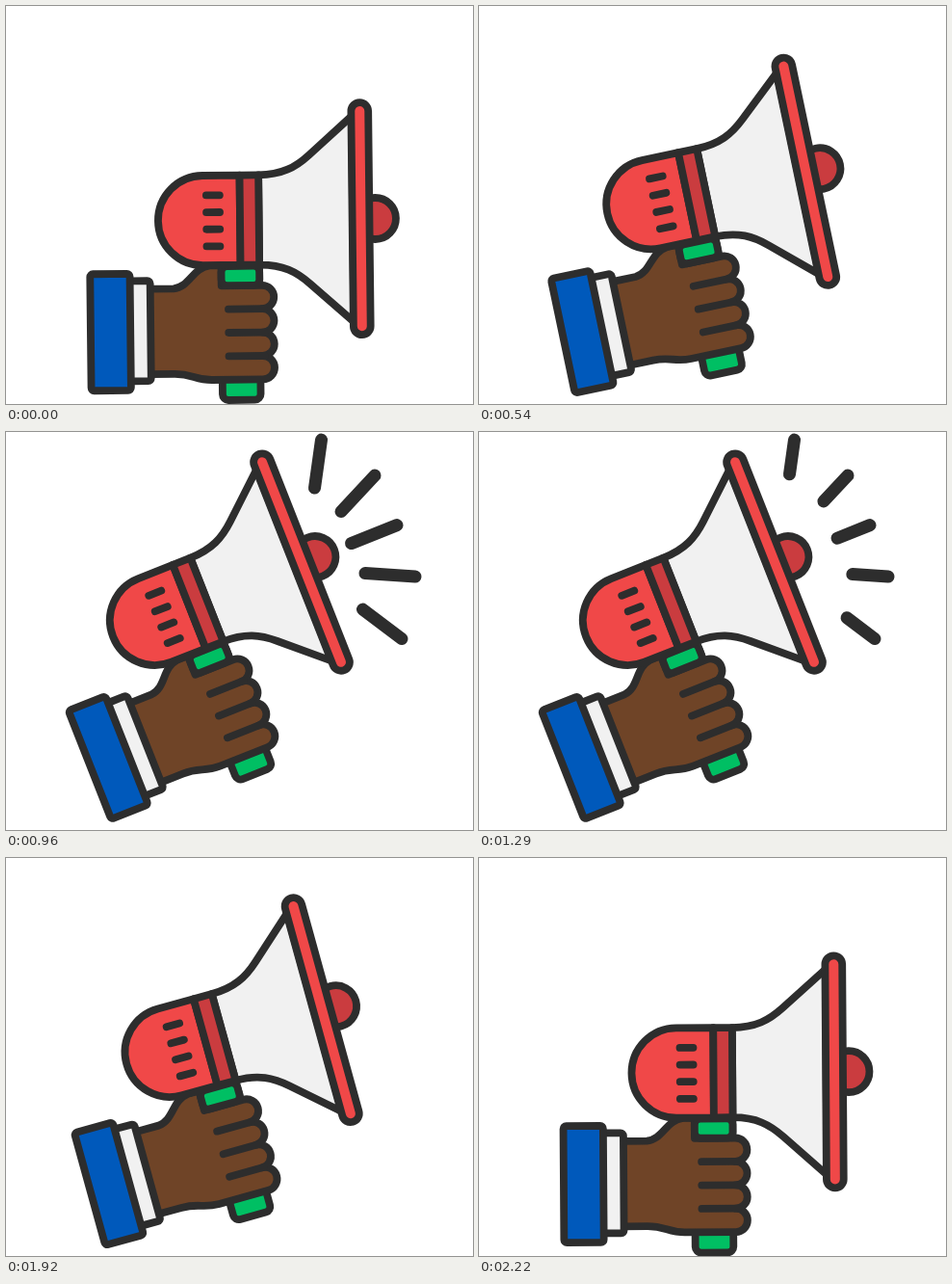
Animation, 485 px wide and 413 px high, one loop 2250 ms. Source, as an HTML page:

```html
<!DOCTYPE html>
<html lang="en">
<head>
<meta charset="utf-8">
<title>Megaphone</title>
<style>
  html, body { margin: 0; width: 100%; height: 100%; overflow: hidden; background: #fff; }
  svg { display: block; width: 485px; height: 413px; }
  .ink { stroke: #2d2d2d; stroke-width: 7.8; stroke-linecap: round; stroke-linejoin: round; }
  #rays { stroke: #2d2d2d; stroke-width: 13; stroke-linecap: round; }
</style>
</head>
<body>
<svg viewBox="0 0 485 413">
  <g transform="translate(.5 .6)">
    <g id="rays"></g>
    <g id="arm" class="ink">
      <!-- handle and hand -->
      <rect x="223.8" y="262" width="39.6" height="147.8" rx="6" fill="#00bf63"/>
      <path fill="#6f4427" d="M149 293.5H174C191 292 194 272 212 270H223.8V291H266
        a12.2 12.2 0 0 1 0 24.4a12.2 12.2 0 0 1 0 24.4a12.2 12.2 0 0 1 0 24.4a12.2 12.2 0 0 1 0 24.4
        H213C195 388.5 193 382 174 382H149Z"/>
      <path fill="none" d="M230.8 315.4H268M230.8 339.8H268M230.8 364.2H268"/>
      <rect x="223.8" y="270.8" width="39.6" height="20.2" rx="6" fill="#00bf63"/>
      <!-- cuff and sleeve -->
      <rect x="128" y="285" width="21.8" height="104" rx="3" fill="#f1f1f1"/>
      <rect x="87.5" y="277.5" width="41.3" height="121" rx="3" fill="#0059bb"/>
      <!-- horn -->
      <circle cx="384.3" cy="223" r="21.5" fill="#ca3c3f"/>
      <path fill="#f1f1f1" d="M263.5 176.5C288 176.5 302 169 316 156.5L361 116.5V330L316 290C302 277.5 288 269.7 263.5 269.7Z"/>
      <path fill="#f04848" d="M243.9 176.5H205.4a46.6 46.6 0 0 0 0 93.2H243.9Z"/>
      <path fill="#ca3c3f" d="M243.9 176.5H263.5V269.7H243.9Z"/>
      <path fill="none" d="M209 197H223M209 214.7H223M209 232.3H223M209 250H223"/>
      <rect x="360.5" y="102.5" width="17.8" height="241" rx="8.9" fill="#f04848"/>
    </g>
  </g>
</svg>
<script>
const LOOP = 2250, STEP = 30;
const PIVOT = '105.2 344';
const REST = -0.64, LOW = -0.39, HIGH = -21.54;
const RAYS_ON = 960, RAYS_OFF = 1590, PULSE = 210;

// inner x, y, outer x, y
const RAYS = [
  [320, 57.5, 327, 7.5],
  [347.5, 82, 382.5, 44.5],
  [358, 115, 405.5, 96],
  [372.5, 146, 424.5, 149.5],
  [370, 183.5, 410.5, 214]
];

const arm = document.getElementById('arm');
const rays = document.getElementById('rays');
const lines = RAYS.map(([, , x, y]) => {
  const line = document.createElementNS('http://www.w3.org/2000/svg', 'line');
  line.setAttribute('x2', x);
  line.setAttribute('y2', y);
  return rays.appendChild(line);
});

const mix = (a, b, p) => a + (b - a) * p;

function armAngle(t) {
  if (t < 300) return REST;
  if (t < 750) return mix(REST - 0.2, HIGH, (t - 300) / 450);
  if (t < 1800) return HIGH;
  return mix(HIGH + 0.1, LOW, Math.min(1, (t - 1800) / 420));
}

function drawRays(t) {
  const on = t >= RAYS_ON && t < RAYS_OFF;
  rays.style.display = on ? '' : 'none';
  if (!on) return;
  const phase = (t - RAYS_ON) / PULSE * 2 * Math.PI;
  const trim = 0.15 * (1 - Math.cos(phase));
  RAYS.forEach(([x1, y1, x2, y2], i) => {
    lines[i].setAttribute('x1', mix(x1, x2, trim));
    lines[i].setAttribute('y1', mix(y1, y2, trim));
  });
}

function draw(ms) {
  const t = Math.floor((ms % LOOP) / STEP) * STEP;
  arm.setAttribute('transform', `rotate(${armAngle(t)} ${PIVOT})`);
  drawRays(t);
}

const start = performance.now();
function tick() {
  draw(performance.now() - start);
  requestAnimationFrame(tick);
}
tick();
</script>
</body>
</html>
```
